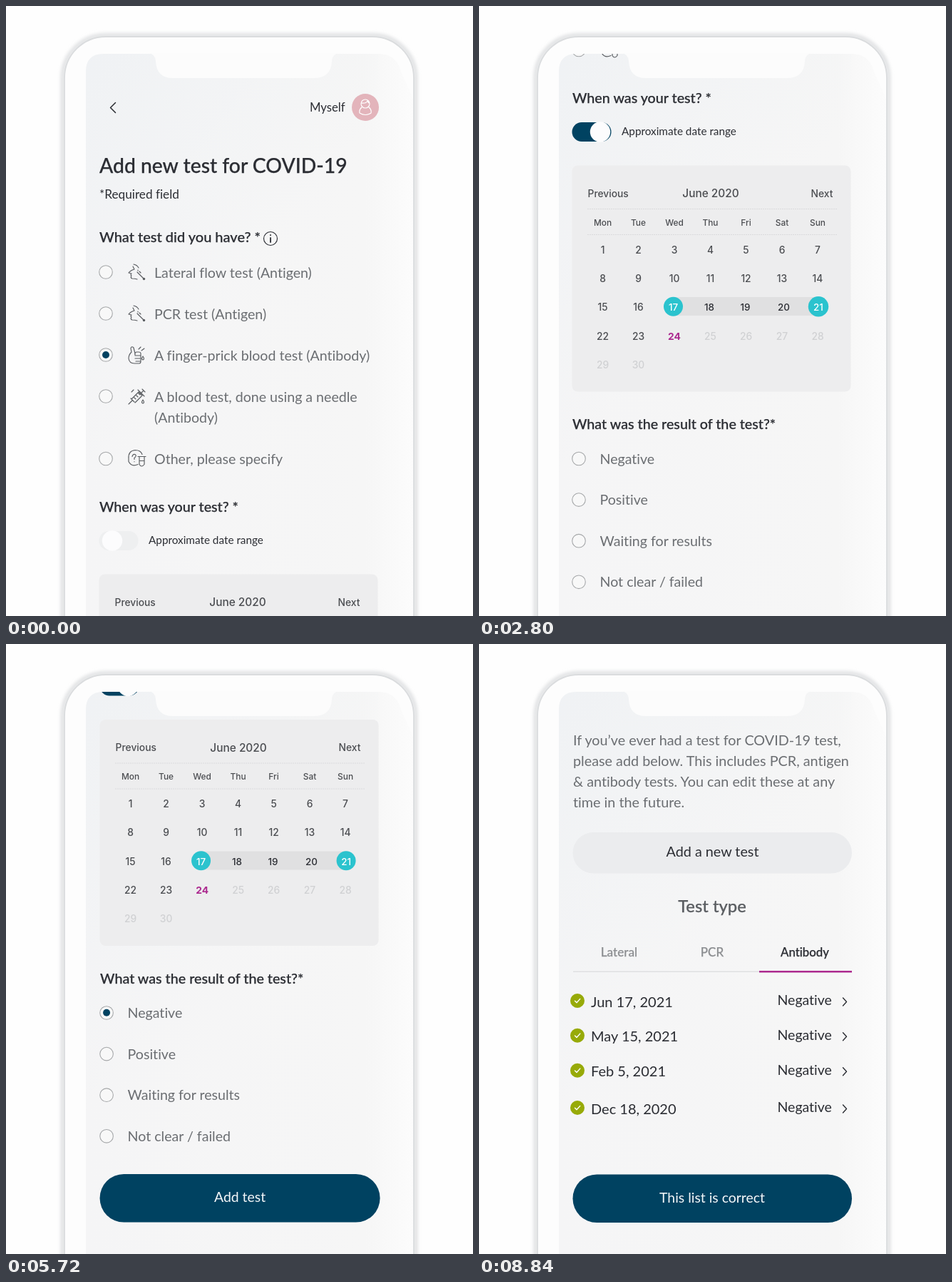
Write an HTML page that moves like this. It is 655 px wide and 855 px high and loops after 8880 ms.

```html
<!DOCTYPE html>
<html lang="en">
<head>
<meta charset="utf-8">
<title>Add a test</title>
<style>
html, body { margin: 0; width: 100%; height: 100%; overflow: hidden; background: #fefefe; }
svg { display: block; width: 655px; height: 855px; }
text { font-family: Lato, "Open Sans", sans-serif; font-size: 19.6px; fill: #6b6e72; white-space: pre; font-variant-ligatures: none; }
.cal text { font-family: Inter, Roboto, sans-serif; font-size: 13.8px; font-weight: 500; fill: #4b4d51; text-anchor: middle; }
.mid { text-anchor: middle; }
.dark { fill: #2b2d33; }
.head { fill: #2b2d33; font-weight: 500; stroke: #2b2d33; stroke-width: .25px; }
.white { fill: #f4f7f9; }
.line { fill: none; stroke: #595c60; stroke-width: 1.15; stroke-linecap: round; stroke-linejoin: round; }
.ring { fill: #f8f8f8; stroke: #a6a8aa; stroke-width: 1.1; }
</style>
</head>
<body>
<svg viewBox="0 0 655 855">
  <defs>
    <linearGradient id="glass" x1="112" x2="572" y1="0" y2="0" gradientUnits="userSpaceOnUse">
      <stop offset="0" stop-color="#f5f5f6"/>
      <stop offset=".85" stop-color="#f6f6f6"/>
      <stop offset="1" stop-color="#fcfcfc"/>
    </linearGradient>
    <linearGradient id="tint" x1="112" x2="400" y1="67" y2="300" gradientUnits="userSpaceOnUse">
      <stop offset="0" stop-color="#e9eef2" stop-opacity=".45"/>
      <stop offset="1" stop-color="#e9eef2" stop-opacity="0"/>
    </linearGradient>
    <filter id="soft" x="-10%" y="-10%" width="120%" height="120%"><feGaussianBlur stdDeviation="2.6"/></filter>
    <filter id="edge" x="-10%" y="-10%" width="120%" height="120%"><feGaussianBlur stdDeviation=".7"/></filter>
    <clipPath id="view"><path d="M112 855V92Q112 67 137 67H529Q554 67 554 92V855Z"/></clipPath>
  </defs>
  <rect x="79.5" y="41" width="495" height="900" rx="60" fill="#fff" stroke="#dadcde" stroke-width="5" filter="url(#soft)"/>
  <rect x="82" y="43" width="490" height="900" rx="58" fill="#fdfdfd" stroke="#dadcde" stroke-width="1.8" filter="url(#edge)"/>
  <path d="M112 855V92Q112 67 137 67H522Q548 67 554 92L571 130V855Z" fill="url(#glass)"/>
  <path d="M112 855V92Q112 67 137 67H522V855Z" fill="url(#tint)"/>
  <g clip-path="url(#view)">
    <g id="form"></g>
    <g id="list"></g>
  </g>
  <path d="M200 66Q209 67 210 77Q211 101 234 101H432Q456 101 457 77Q458 67 467 66Z" fill="#fcfcfc"/>
</svg>
<script>
const LOOP = 8880, NAVY = '#004261', TEAL = '#2bc3ce', MAGENTA = '#ac2a8f', PAGE = 573;
const $ = id => document.getElementById(id);
const text = (x, y, s, cls = '', size = 19.6, extra = '') =>
  `<text x="${x}" y="${y}" class="${cls}" style="font-size:${size}px;${extra}">${s}</text>`;
const line = (d, extra = '') => `<path class="line" d="${d}" ${extra}/>`;
const ring = y => `<circle class="ring" cx="140" cy="${y}" r="9.3"/>`;
const button = (x, y, w, label) =>
  `<rect x="${x}" y="${y}" width="${w}" height="67.5" rx="33.7" fill="${NAVY}"/>` +
  text(327, y + 39, label, 'white mid', 19.4);

// Option icons, drawn around (183, 0)
const swab = line(`M179 -11Q184 -10 186 -6M178 -8L180 -4Q174 -2 172 1L176 2Q174 4 176 5Q174 8 177 9Q181 9 184 10
  M184 0L194 10M187 -1L189 1M185 -3V-2`) +
  '<circle cx="193.5" cy="9.5" r="1.7" fill="#595c60"/>';
const finger = line(`M181 -2L179 -10Q176 -13 175 -9L176 -4Q172 0 172 5Q173 12 180 12H187Q189 12 189 9V-2Q189 -4 186 -4H183Q180 -3 181 0Z
  M181 1H189M181 5H189M182 9H189M186 -8L189 -11M190 -6L194 -9M192 2Q189 6 192 7Q195 6 192 2`);
const syringe = line(`M172 11L177 6M175 3L180 8M176 4L186 -6L191 -1L181 9M185 -9L194 0M189 -4L193 -8M191 -10L195 -6
  M179 1L182 4M182 -2L185 1M185 -5L188 -2M192 5Q189 9 192 10Q195 9 192 5M176 -6L179 -9`);
const tube = line(`M185 8Q176 12 172 4V0Q171 -11 181 -12Q189 -12 191 -6M177 -3Q178 -7 181 -6Q184 -4 180 -1V1M180 4V4.2
  M185 -3H196M187 -3V8Q190 13 194 8V-3M187 3H194`);

const options = [
  [373, swab, 'Lateral flow test (Antigen)'],
  [431, swab, 'PCR test (Antigen)'],
  [489, finger, 'A finger-prick blood test (Antibody)'],
  [547, syringe, 'A blood test, done using a needle'],
  [634.5, tube, 'Other, please specify']
].map(([y, icon, label]) =>
  ring(y) + `<g transform="translate(0 ${y})">${icon}</g>` + text(208, y + 7.5, label)).join('');

function calendar() {
  const columns = [173.5, 223.5, 274, 324.5, 374.5, 425, 475];
  const names = ['Mon', 'Tue', 'Wed', 'Thu', 'Fri', 'Sat', 'Sun'];
  let out = '<rect x="130.5" y="223.5" width="391" height="317" rx="8" fill="#ededee"/>' +
    text(181.2, 267.5, 'Previous', '', 13.8) + text(325, 268, 'June 2020', '', 15.4) +
    text(481, 267.5, 'Next', '', 13.8) +
    '<path d="M152 284.5H503M152 320.5H503" stroke="#dadadc" stroke-dasharray="2 1"/>' +
    '<rect id="band" x="272" y="408" height="26" fill="#e0e0e1"/>';
  names.forEach((name, i) => out += text(columns[i], 307.5, name, '', 11.9));
  for (let day = 1; day <= 30; day++) {
    const col = (day - 1) % 7, row = Math.floor((day - 1) / 7);
    const inRange = day > 16 && day < 22, ends = day === 17 || day === 21;
    const x = inRange ? [272.5, 323, 373.5, 427.5, 476][day - 17] : columns[col];
    const style = day === 24 ? `fill:${MAGENTA};font-weight:700` : day > 24 ? 'fill:#d0d1d3'
      : inRange ? 'fill:#2b2d33' : '';
    if (ends) out += `<circle id="dot${day}" cx="${x}" cy="421.3" fill="${TEAL}"/>`;
    const label = text(x, 346.6 + row * 40.3, day, '', inRange ? 13.4 : 13.8, style);
    out += ends ? label.replace('<text', `<text id="day${day}"`) : label;
  }
  return `<g class="cal">${out}</g>`;
}

const answers = ['Negative', 'Positive', 'Waiting for results', 'Not clear / failed']
  .map((label, i) => ring(634.5 + i * 57.6) + text(169.5, 641.5 + i * 57.6, label)).join('');

$('form').innerHTML =
  line('M153.5 135.5L146.5 142.5L153.5 149.5', 'style="stroke:#2b2d33;stroke-width:1.5"') +
  text(426, 148, 'Myself', 'dark', 16.7) +
  '<circle cx="504" cy="142" r="19" fill="#e3b4bb"/>' +
  line(`M498 137A6 6 0 1 1 510 137A6 6 0 1 1 498 137M498.5 136Q505 137 507 133Q508 136 510 136
    M499 142Q495 145 496 150Q504 155 512 150Q513 145 509 142`, 'style="stroke:#fff"') +
  text(131, 234, 'Add new test for COVID-19', 'head', 28.3) +
  text(131, 270, '*Required field', 'dark', 17.2) +
  text(131, 331, 'What test did you have? *', 'head', 20) +
  '<circle class="line" cx="371" cy="326" r="9.5" style="stroke:#2b2d33"/>' +
  line('M371 325V331M371 321V321.3', 'style="stroke:#2b2d33;stroke-width:1.8"') +
  options + text(208, 583.5, '(Antibody)') +
  `<circle cx="140" cy="489" r="5" fill="${NAVY}"/>` +
  text(131, 709, 'When was your test? *', 'head', 19.7) +
  '<rect id="track" x="130.5" y="736" width="55" height="27" rx="13.5"/>' +
  '<circle id="knob" cy="749.5" r="14.2" fill="#fcfcfd"/>' +
  text(200, 754, 'Approximate date range', 'dark', 15.3) +
  `<g transform="translate(0 ${PAGE})">` + calendar() +
  text(131, 593, 'What was the result of the test?*', 'head', 19.7) + answers +
  `<circle id="answer" cx="140" cy="634.3" fill="${NAVY}"/>` +
  button(130.5, 860.5, 393, 'Add test') + '</g>';

const check = '<circle r="10" fill="#97aa08"/>' +
  line('M-3.5 .3L-1 2.8L3.8 -2.6', 'style="stroke:#fff;stroke-width:1.4"');
const result = (y, date) => text(157, y + 8.7, date, 'dark', 20) +
  text(418.5, y + 6.3, 'Negative', 'dark', 19.5) +
  line(`M510.5 ${y - 4}L515.5 ${y + 1.5}L510.5 ${y + 7}`, 'style="stroke:#2b2d33;stroke-width:1.4"');
const checkAt = y => `<g transform="translate(138 ${y})">${check}</g>`;

$('list').innerHTML =
  ['If you’ve ever had a test for COVID-19 test,', 'please add below. This includes PCR, antigen',
   '&amp; antibody tests. You can edit these at any', 'time in the future.']
    .map((s, i) => text(132, 142 + i * 28.9, s, '', 19.8)).join('') +
  '<rect x="131.5" y="264" width="391.5" height="57.5" rx="28.7" fill="#ebecee"/>' +
  text(327.5, 298, 'Add a new test', 'dark mid', 19.8) +
  text(327, 375.5, 'Test type', 'head mid', 23.8, 'fill:#5a5d61;stroke:#5a5d61') +
  text(196.5, 438, 'Lateral', 'head mid', 17.2, 'fill:#8d8f92;stroke:#8d8f92') +
  text(327, 438, 'PCR', 'head mid', 17, 'fill:#8d8f92;stroke:#8d8f92') +
  text(457, 438, 'Antibody', 'head mid', 16.8) +
  '<path d="M132 459.3H393" stroke="#dfe0e2" stroke-width="1.5"/>' +
  `<path d="M393 459.3H523" stroke="${MAGENTA}" stroke-width="2.5"/>` +
  `<g id="newest">${result(500, 'Jun 17, 2021')}</g><g id="tick">${check}</g><g id="older">` +
  [[548.7, 'May 15, 2021'], [597.7, 'Feb 5, 2021'], [650, 'Dec 18, 2020']]
    .map(([y, date]) => checkAt(y) + result(y, date)).join('') + '</g>' +
  button(131.5, 743.5, 391.5, 'This list is correct');

const span = (t, start, length) => Math.min(1, Math.max(0, (t - start) / length));
const inOut = u => u < .5 ? 4 * u ** 3 : 1 - 4 * (1 - u) ** 3;
const back = u => u <= 0 ? 0 : 1 + 2.70158 * (u - 1) ** 3 + 1.70158 * (u - 1) ** 2;
const mix = (from, to, u) => `rgb(${from.map((v, i) => Math.round(v + (to[i] - v) * u))})`;
const set = (id, name, value) => $(id).setAttribute(name, value);

function draw(t) {
  const scroll = PAGE * inOut(span(t, 50, 1144)) + 117.5 * inOut(span(t, 4040, 850));
  const slide = 470 * inOut(span(t, 5640, 980));
  set('form', 'transform', `translate(${slide} ${-scroll})`);
  set('list', 'transform', `translate(${slide - 470} 0)`);

  set('track', 'fill', mix([238, 239, 240], [0, 66, 97], span(t, 1440, 400)));
  set('knob', 'cx', 149 + 21 * inOut(span(t, 1300, 300)));

  for (const [day, start] of [[17, 1340], [21, 2100]]) {
    set('dot' + day, 'r', 13.5 * back(span(t, start, 900)));
    $('day' + day).style.fill = mix([43, 45, 51], [255, 255, 255], span(t, start + 60, 240));
  }
  set('band', 'width', 204 * inOut(span(t, 2000, 600)));
  set('answer', 'r', 5 * back(span(t, 3000, 700)));

  set('older', 'transform', `translate(0 ${-49 * (1 - inOut(span(t, 6650, 700)))})`);
  set('newest', 'opacity', span(t, 7380, 520));
  set('tick', 'transform', `translate(138 500) scale(${back(span(t, 7940, 890))})`);
}

function frame(now) {
  draw(now % LOOP);
  requestAnimationFrame(frame);
}
draw(0);
requestAnimationFrame(frame);
</script>
</body>
</html>
```
